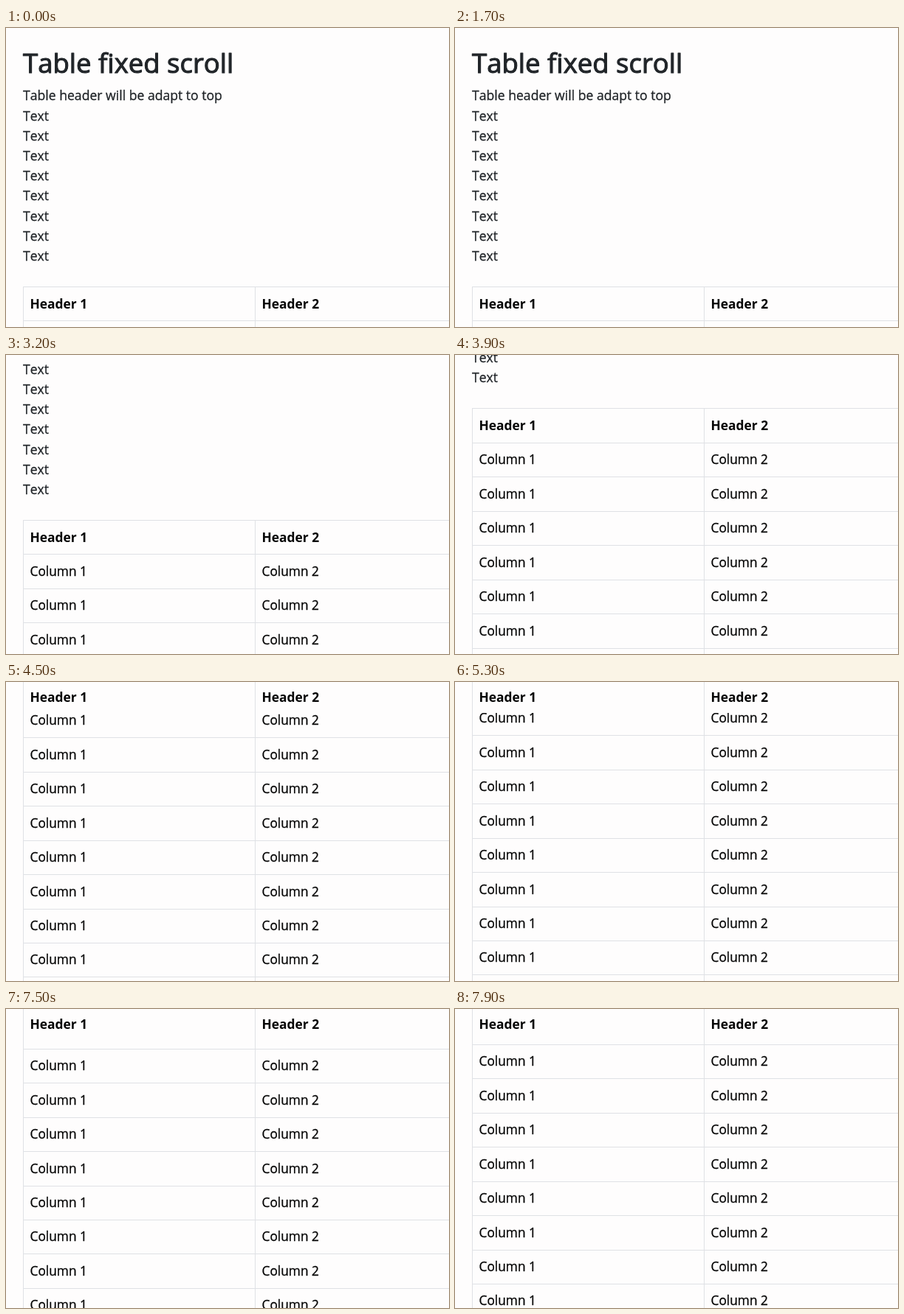
An HTML page with a canvas that plays this animation: 600 px wide and 406 px high, repeating every 8000 ms.

```html
<!DOCTYPE html>
<html lang="en">
<head>
<meta charset="utf-8">
<title>Table fixed scroll</title>
<style>
  html, body { margin: 0; width: 100%; height: 100%; overflow: hidden; background: #fefdfd; }
  canvas { display: block; }
</style>
</head>
<body>
<canvas id="stage" width="600" height="406"></canvas>
<script>
const W = 600, H = 406, LOOP = 8000, STEP = 100;
const PAPER = '#fefdfd', RULE = '#dfe1e5', INK = '#212529', BLACK = '#050505';
const FAMILY = '"Open Sans", "Noto Sans", sans-serif';
const LINE = 27.2, ROW = 46.43, ROWS = 24;
const TABLE_TOP = 351, TEXT_DROP = 29.5;
const STICKY_BASE = 26.5, STICKY_BOTTOM = 42;
const COLS = [23, 337];

// Text styles; "extra" thickens the strokes to a medium weight
const TITLE = { font: `400 36.5px ${FAMILY}`, color: INK, extra: 1.1 };
const BODY = { font: `400 17.6px ${FAMILY}`, color: INK, extra: 0.3 };
const CELL = { font: `400 17.3px ${FAMILY}`, color: BLACK, extra: 0.3 };
const HEAD = { font: `700 17.4px ${FAMILY}`, color: BLACK, extra: 0 };

// Scroll position: [time, offset]
const KEYS = [
  [0, 0], [2020, 0], [2400, 17], [3200, 127], [4500, 414.9],
  [5300, 557.2], [5900, 577.6], [7420, 577.6], [7900, 535.2], [8100, 500]
];

const ctx = document.getElementById('stage').getContext('2d');
ctx.fontKerning = 'none';
ctx.lineJoin = 'round';

const slope = i => (KEYS[i + 1][1] - KEYS[i][1]) / (KEYS[i + 1][0] - KEYS[i][0]);

// Harmonic mean keeps the curve monotone between keys
function tangent(i) {
  if (i === 0 || i === KEYS.length - 1) return 0;
  const a = slope(i - 1), b = slope(i);
  return a * b <= 0 ? 0 : 2 * a * b / (a + b);
}

function scrollAt(t) {
  let i = 0;
  while (i < KEYS.length - 2 && t >= KEYS[i + 1][0]) i++;
  const [t0, y0] = KEYS[i], [t1, y1] = KEYS[i + 1];
  const d = t1 - t0, u = (t - t0) / d, v = 1 - u;
  return y0 * (1 + 2 * u) * v * v + y1 * u * u * (3 - 2 * u)
    + d * u * v * (tangent(i) * v - tangent(i + 1) * u);
}

function text(str, x, y, style) {
  if (y < -20 || y > H + 30) return;
  y = Math.round(y);
  ctx.font = style.font;
  ctx.fillStyle = ctx.strokeStyle = style.color;
  ctx.fillText(str, x, y);
  if (style.extra) {
    ctx.lineWidth = style.extra;
    ctx.strokeText(str, x, y);
  }
}

function rect(x, y, w, h, color) {
  ctx.fillStyle = color;
  ctx.fillRect(x, y, w, h);
}

function drawIntro(s) {
  text('Table fixed scroll', 23, 60.5 - s, TITLE);
  text('Table header will be adapt to top', 23, 98.4 - s, BODY);
  for (let i = 1; i <= 8; i++) text('Text', 23, 98.4 + i * LINE - s, BODY);
}

function drawTable(s) {
  const top = TABLE_TOP - s;
  for (let k = 0; k <= ROWS; k++) {
    const y = top + k * ROW;
    rect(COLS[0], Math.round(y), W - COLS[0], 1, RULE);
    if (k) COLS.forEach((x, i) => text('Column ' + (i + 1), x + 9.5, y + TEXT_DROP, CELL));
  }
  const base = Math.max(top + TEXT_DROP, STICKY_BASE);
  if (base === STICKY_BASE) rect(0, 0, W, STICKY_BOTTOM, PAPER);
  COLS.forEach((x, i) => {
    const y = Math.max(0, Math.round(top));
    rect(x, y, 1, H - y, RULE);
    text('Header ' + (i + 1), x + 9.5, base, HEAD);
  });
}

function frame(now) {
  const t = Math.floor(now % LOOP / STEP) * STEP;
  const s = scrollAt(t);
  rect(0, 0, W, H, PAPER);
  drawIntro(s);
  drawTable(s);
  requestAnimationFrame(() => frame(performance.now() - start));
}

const start = performance.now();
frame(0);
</script>
</body>
</html>
```
